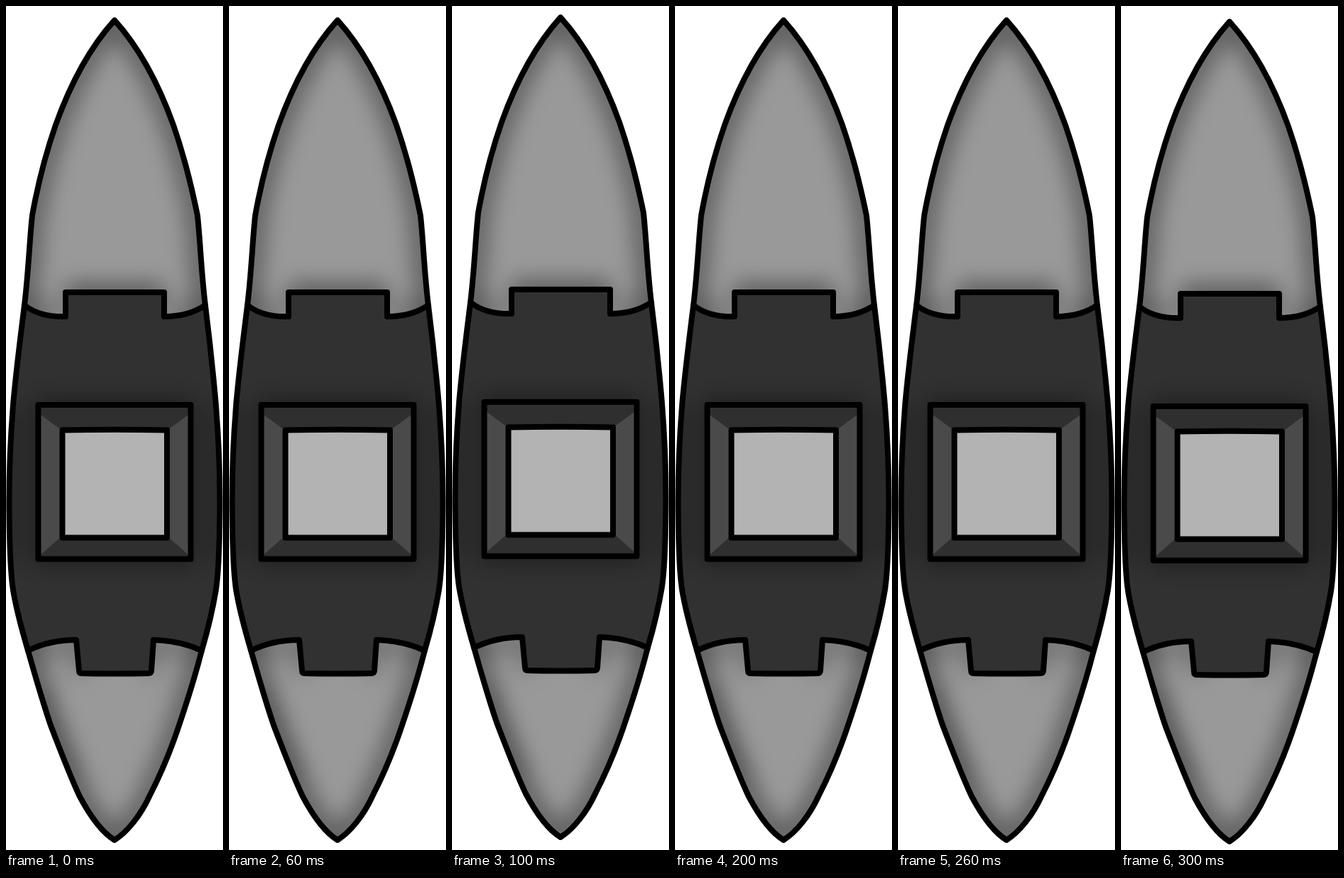
Write an HTML page that moves like this. It is 306 px wide and 1185 px high and loops after 0.4 s.

```html
<!DOCTYPE html>
<html lang="en">
<head>
<meta charset="utf-8">
<title>Bobbing boat</title>
<style>
  html, body { margin: 0; width: 100%; height: 100%; overflow: hidden; background: #fff; }
  svg { display: block; width: 306px; height: 1185px; }
  #boat { animation: bob 400ms step-end infinite; }
  @keyframes bob {
    0%, 50%, 100% { transform: translateY(0); }
    25% { transform: translateY(-4px); }
    75% { transform: translateY(2px); }
  }
  .line { fill: none; stroke: #000; stroke-width: 8; stroke-linejoin: round; stroke-linecap: round; }
  .shade { fill: none; stroke: #000; }
</style>
</head>
<body>
<svg viewBox="0 0 306 1185">
  <defs>
    <path id="hull" d="M153 20 C113 64 87 120 70 167 C55 210 44 255 37 294 C33 330 32 370 26 420
      C19 475 13 525 10 560 C6 610 4 660 4.500 710 C5 760 6 795 10 820 C15 850 23 878 31 905
      C41 940 51 975 63 1010 C78 1049 91 1083 104 1110 C118 1136 135 1160 153 1171
      C171 1160 190 1136 202 1110 C216 1083 231 1049 244 1010 C256 975 267 940 276 905
      C284 878 291 850 296 820 C300 795 301 760 301.500 710 C302 660 300 610 296 560
      C293 525 288 475 281 420 C275 370 274 330 270 294 C262 255 251 210 236 167
      C219 120 193 64 153 20 Z"/>
    <path id="deck" d="M26 420 Q47 437 84 436 V402 H223 V436 Q258 436 281 420 L340 420 V905 H276
      Q245 891 208 890 L205 933 Q205 937 200 937 Q153 938 107 937 Q103 937 103 933
      L99 890 Q62 890 31 905 H-30 V420 Z"/>
    <path id="edges" d="M26 420 Q47 437 84 436 V402 H223 V436 Q258 436 281 420
      M31 905 Q62 890 99 890 L103 933 Q103 937 107 937 Q153 938 200 937 Q205 937 205 933
      L208 890 Q245 891 276 905"/>
    <clipPath id="inHull"><use href="#hull"/></clipPath>
    <clipPath id="inDeck"><use href="#deck"/></clipPath>
    <filter id="soft" filterUnits="userSpaceOnUse" x="-80" y="-60" width="466" height="1310">
      <feGaussianBlur stdDeviation="16"/>
    </filter>
  </defs>
  <g id="boat">
    <g clip-path="url(#inHull)">
      <path fill="#999" d="M0 0H306V1185H0Z"/>
      <g filter="url(#soft)">
        <use href="#hull" class="shade" stroke-width="30" opacity=".42"/>
        <path class="shade" stroke-width="26" opacity=".5" d="M84 404H223"/>
        <path class="shade" stroke-width="22" opacity=".3" d="M26 422L84 436M223 436L281 422M31 905L103 892V937M205 937V892L276 905"/>
        <path class="shade" stroke-width="24" opacity=".25" d="M40 960L95 1090"/>
      </g>
      <g clip-path="url(#inDeck)">
        <path fill="#313131" d="M0 390H306V950H0Z"/>
        <g filter="url(#soft)">
          <path opacity=".35" d="M40 550H266V786H40Z"/>
          <path class="shade" stroke-width="24" opacity=".25" d="M8 560V780M298 560V780"/>
        </g>
      </g>
    </g>
    <use href="#edges" class="line"/>
    <use href="#hull" class="line"/>
    <path fill="#2f2f2f" d="M45 560H261V777H45Z"/>
    <path fill="#4a4a4a" d="M45 571L79 596V744L45 774ZM261 571L227 596V744L261 774Z"/>
    <path class="line" d="M45.500 560H260.500V776.500H45.500Z"/>
    <path class="line" fill="none" style="fill:#b3b3b3" d="M79.500 595.500Q153 594 227 595.500V746.500H79.500Z"/>
  </g>
</svg>
</body>
</html>
```
